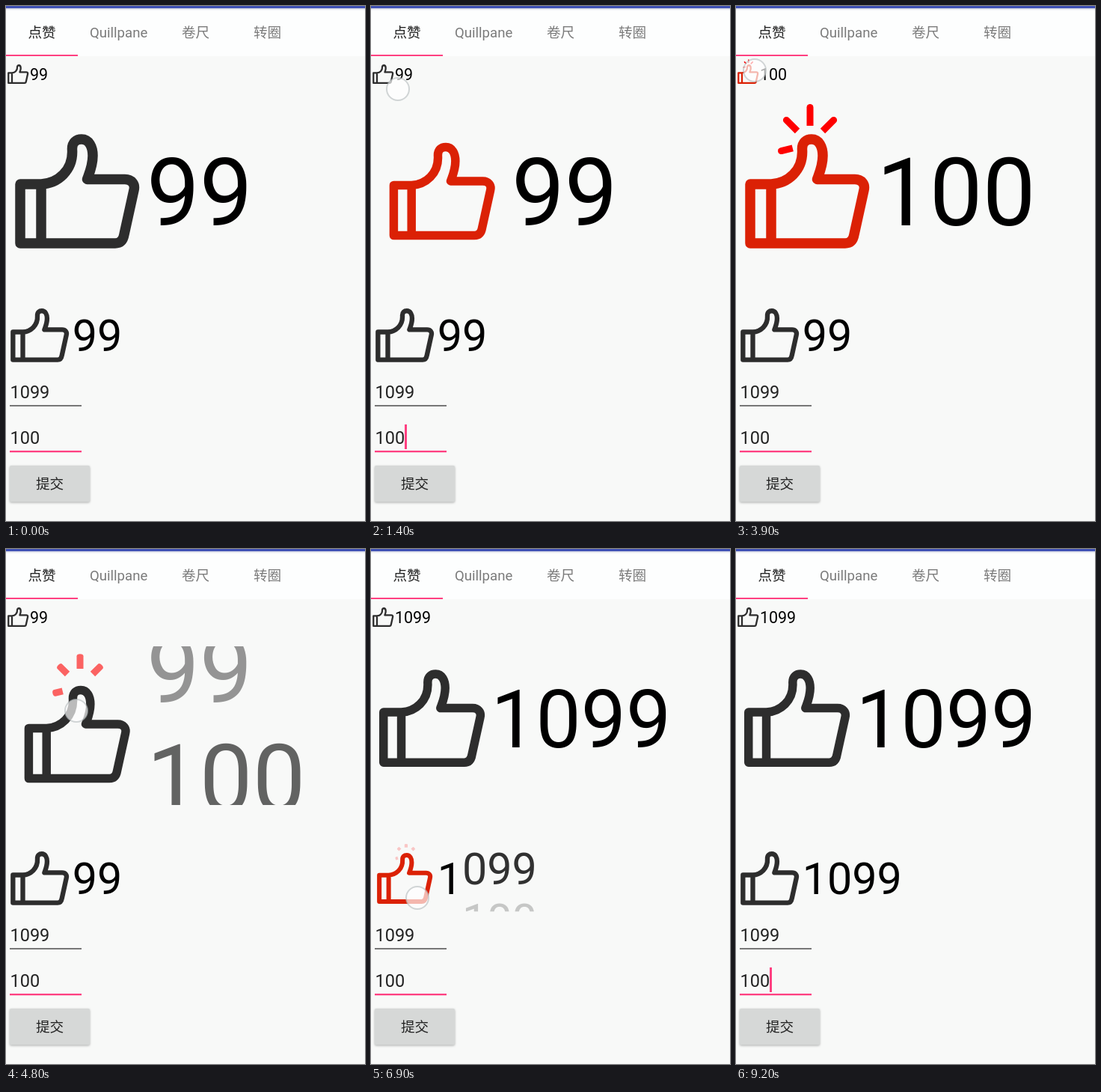
Recreate the animation shown at these times as an HTML page. Size 480 px wide and 688 px high, loop 9.4 s.

```html
<!DOCTYPE html>
<html lang="zh">
<head>
<meta charset="utf-8">
<title>点赞</title>
<style>
  html, body { margin: 0; width: 100%; height: 100%; overflow: hidden; background: #f8f9f8; }
  svg { display: block; width: 480px; height: 688px; }
  text { font-family: Roboto, "Noto Sans CJK SC", "Noto Sans CJK", sans-serif; white-space: pre; }
  .tab { font-size: 18.6px; fill: #7b7b7b; }
  .on { fill: #222; }
  .field { font-size: 23.5px; fill: #222; }
  .num { font-size: 126px; }
  .thumb { fill: none; stroke-width: 13.5; stroke-linejoin: round; }
  .rays { fill: #fe0000; }
  .pink { fill: #ff4081; }
  .button { fill: #d6d8d7; filter: drop-shadow(0 1px 1.5px rgba(0, 0, 0, .3)); }
  .touch { fill: #fff; fill-opacity: .68; stroke: #b4babc; stroke-opacity: .6; stroke-width: 2; }
</style>
</head>
<body>
<svg viewBox="0 0 480 688">
  <defs>
    <linearGradient id="shade" x2="0" y2="1">
      <stop stop-color="#d0d3e2"/>
      <stop offset="1" stop-color="#fdfefe"/>
    </linearGradient>
    <clipPath id="window"><path d="M180 130H560V342H180z"/></clipPath>
    <path id="thumb" d="M47 238C69 237 90 220 88.500 192C88 182 94 178 101 178C111 178 116 188 116 200C116 213 112 222 108.500 231.500H159C168 231.500 173 238 171 246L158 305Q156 317 146 317H19V238H47V317"/>
  </defs>

  <rect width="480" height="67" fill="#fdfefe"/>
  <rect y="3" width="480" height="3" fill="url(#shade)"/>
  <rect width="480" height="3" fill="#3f51b5"/>
  <g class="tab">
    <text class="on" x="29.500" y="42">点赞</text>
    <text x="112" y="42">Quillpane</text>
    <text x="235" y="42">卷尺</text>
    <text x="331" y="42">转圈</text>
  </g>
  <rect class="pink" y="65" width="96" height="2"/>

  <g id="widgets"></g>

  <text class="field" x="5.500" y="524">1099</text>
  <rect x="5" y="533" width="96" height="2" fill="#777"/>
  <text class="field" x="5.500" y="585">100</text>
  <rect class="pink" x="5" y="594" width="96" height="2.300"/>
  <rect class="pink" id="cursor" x="45" y="559" width="3" height="33"/>
  <rect class="button" x="5" y="614" width="107" height="48.500" rx="2"/>
  <text class="tab on" x="40" y="645">提交</text>
  <circle class="touch" id="touch" r="15"/>
</svg>

<script>
const LOOP = 9400, STEP = 100, SUBMIT = 5800;
const BLINK = 1010, LIT = 530, BLINK_START = 110;
const DIGIT = 70.75, LINE = 146;         // digit advance, distance between rolling values
const NUM_X = 188, NUM_Y = 293;
const SMALL = .85, BIG = 1.1;

const at = (x, y, scale) => `translate(${x} ${y}) scale(${scale})`;

// taps alternate between like and unlike, and so do the spots touched
const widgets = [
  { box: at(0, 49, .17), taps: [1550, 4050], spots: [[36, 111], [25, 86]] },
  { box: at(0, 0, 1), fitted: at(.6, 15.8, .85),
    taps: [300, 900, 1300, 4700, 7475, 8150], spots: [[75, 252], [94, 216]] },
  { box: at(.4, 323.6, .47), taps: [2785, 3400, 6750, 7100], spots: [[62, 466]] },
];
const submit = { taps: [SUBMIT], spots: [[66, 664]] };

const touches = [...widgets, submit]
  .flatMap(({ taps, spots }) => taps.map((time, i) => ({ time, spot: spots[i % spots.length] })))
  .sort((a, b) => b.time - a.time);

const $ = id => document.getElementById(id);
const clamp = v => Math.min(1, Math.max(0, v));
const mix = (a, b, p) => a + (b - a) * clamp(p);

function set(el, attrs) {
  for (const key in attrs) el.setAttribute(key, attrs[key]);
  return el;
}

function add(parent, tag, attrs = {}) {
  const el = document.createElementNS('http://www.w3.org/2000/svg', tag);
  return parent.appendChild(set(el, attrs));
}

// a ray fans out from the thumb tip; the further it leans, the shorter it is
function addRay(parent, angle) {
  const top = 4.5 - (29 - Math.abs(angle) * .085);
  const ray = add(parent, 'g', { transform: `translate(99 184) rotate(${angle}) translate(0 -24)` });
  return add(ray, 'path', { d: `M-4.500 0V${top}a4.500 4.500 0 0 1 9 0V0z` });
}

function build(w) {
  w.root = add($('widgets'), 'g');
  w.rays = add(w.root, 'g', { class: 'rays' });
  w.spikes = [-104, -45, 0, 45].map(angle => addRay(w.rays, angle));
  w.thumb = add(w.root, 'use', { href: '#thumb', class: 'thumb' });
  const num = add(w.root, 'g', { class: 'num', 'clip-path': 'url(#window)' });
  [w.head, w.low, w.high] = [0, 1, 2].map(() => add(num, 'text'));
}

function pose(taps, t) {
  const count = taps.filter(tap => tap <= t).length;
  if (!count) return { scale: 1, red: false, roll: 0 };
  const u = t - taps[count - 1];
  if (count % 2) {
    const scale = u < 100 ? mix(1, SMALL, (u - 25) / 75)
      : u < 225 ? mix(SMALL, BIG, (u - 100) / 125)
      : mix(BIG, 1, (u - 225) / 125);
    return { scale, red: u >= 100, roll: clamp((u - 100) / 250) };
  }
  const scale = mix(SMALL, 1, Math.abs(u - 100) / 100);
  return { scale, red: u < 100, roll: 1 - clamp(u / 250) };
}

function write(el, text, skip, lines, opacity) {
  el.textContent = text;
  set(el, { x: NUM_X + skip * DIGIT, y: NUM_Y + lines * LINE, opacity });
}

function draw(w, t) {
  const { scale, red, roll } = pose(w.taps, t);
  const sent = t >= SUBMIT;
  set(w.root, { transform: sent && w.fitted || w.box });
  set(w.thumb, {
    transform: `${at(95, 247.5, scale)} translate(-95 -247.500)`,
    stroke: red ? '#db2105' : '#2d2d2d',
  });
  set(w.rays, { opacity: roll });
  w.spikes.forEach(el => set(el, { transform: `scale(1 ${mix(.2, 1, roll)})` }));

  const [head, low, high] = sent ? ['1', '099', '100'] : ['', '99', '100'];
  write(w.head, head, 0, 0, 1);
  write(w.low, low, head.length, -roll, 1 - roll);
  write(w.high, high, head.length, 1 - roll, roll);
}

function render(t) {
  widgets.forEach(w => draw(w, t));
  set($('cursor'), { opacity: (t - BLINK_START + BLINK) % BLINK < LIT ? 1 : 0 });
  const touch = touches.find(({ time }) => t >= time - 150 && t < time + 250);
  set($('touch'), { opacity: touch ? 1 : 0 });
  if (touch) set($('touch'), { transform: `translate(${touch.spot})` });
}

widgets.forEach(build);
const start = performance.now();
function tick() {
  const t = (performance.now() - start) % LOOP;
  render(Math.floor(t / STEP) * STEP);
  requestAnimationFrame(tick);
}
tick();
</script>
</body>
</html>
```
